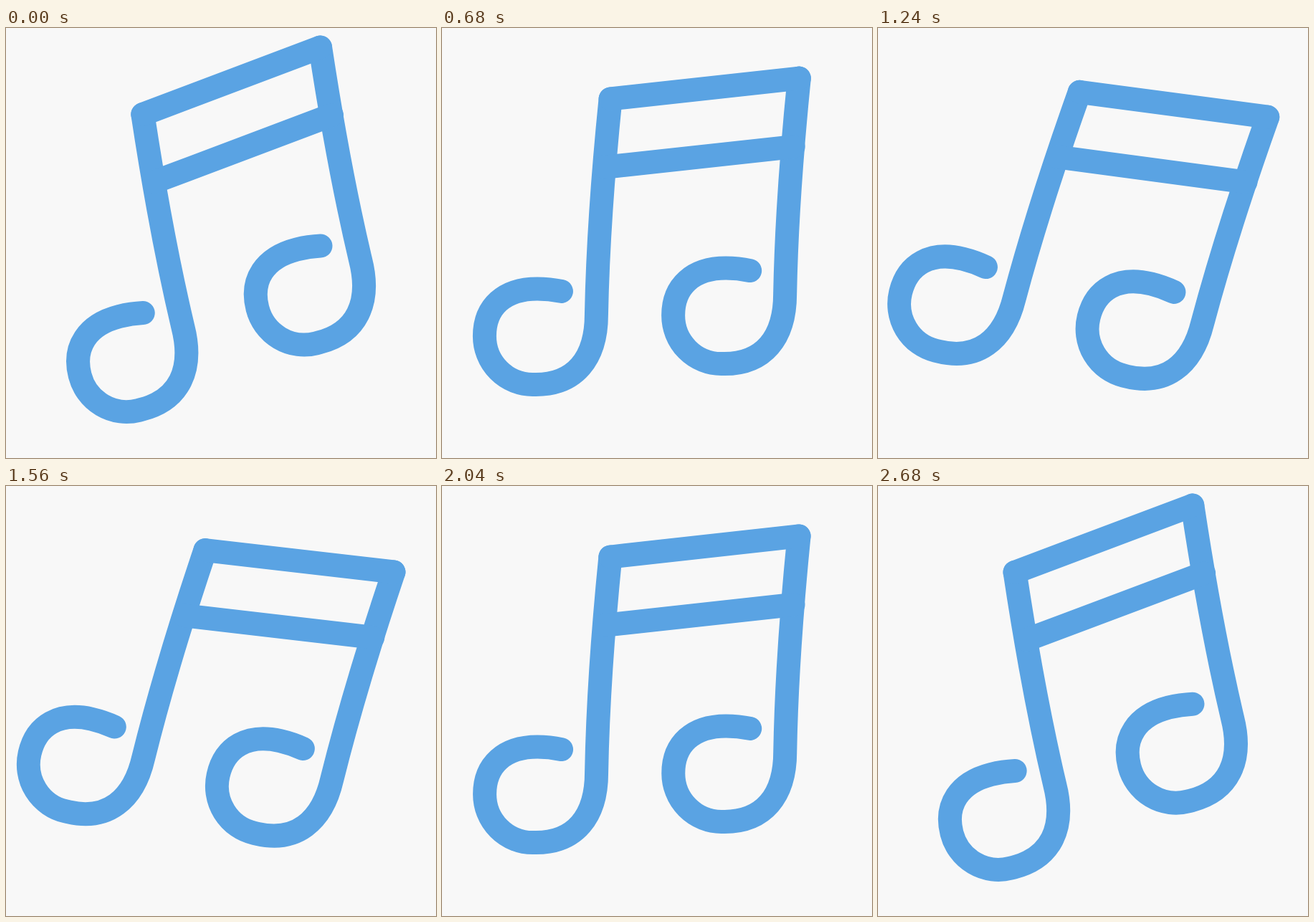
An HTML page for the animation above (2720 ms loop, 600 by 600 pixels).

```html
<!DOCTYPE html>
<html lang="en">
<head>
<meta charset="utf-8">
<title>Swinging note</title>
<style>
  html, body { margin: 0; height: 100%; overflow: hidden; background: #f8f8f8; }
  svg { display: block; width: 100%; height: 100%; }
</style>
</head>
<body>
<svg viewBox="0 0 600 600">
  <defs>
    <path id="stem" d="M235 99 Q218 268 215.5 400 C215.5 462 185 497.5 131 497.5 H126.5
      A67 67.5 0 0 1 59.5 430 C59.5 389 87 364 133 364 Q150 364 166.5 367.5"/>
  </defs>
  <g id="note" fill="none" stroke="#5aa3e3" stroke-width="33" stroke-linecap="round" stroke-linejoin="round">
    <use href="#stem"/>
    <use href="#stem" x="263.2" y="-29"/>
    <path d="M235 99 L498.2 70 M227 194.3 L490.1 165.6"/>
  </g>
</svg>
<script>
  const PERIOD = 2720, SWING = 14.4;
  const note = document.getElementById('note');

  function draw() {
    const phase = performance.now() % PERIOD / PERIOD;
    const angle = -SWING * Math.cos(2 * Math.PI * phase);
    note.setAttribute('transform', `rotate(${angle} 298 284.5)`);
    requestAnimationFrame(draw);
  }
  draw();
</script>
</body>
</html>
```
